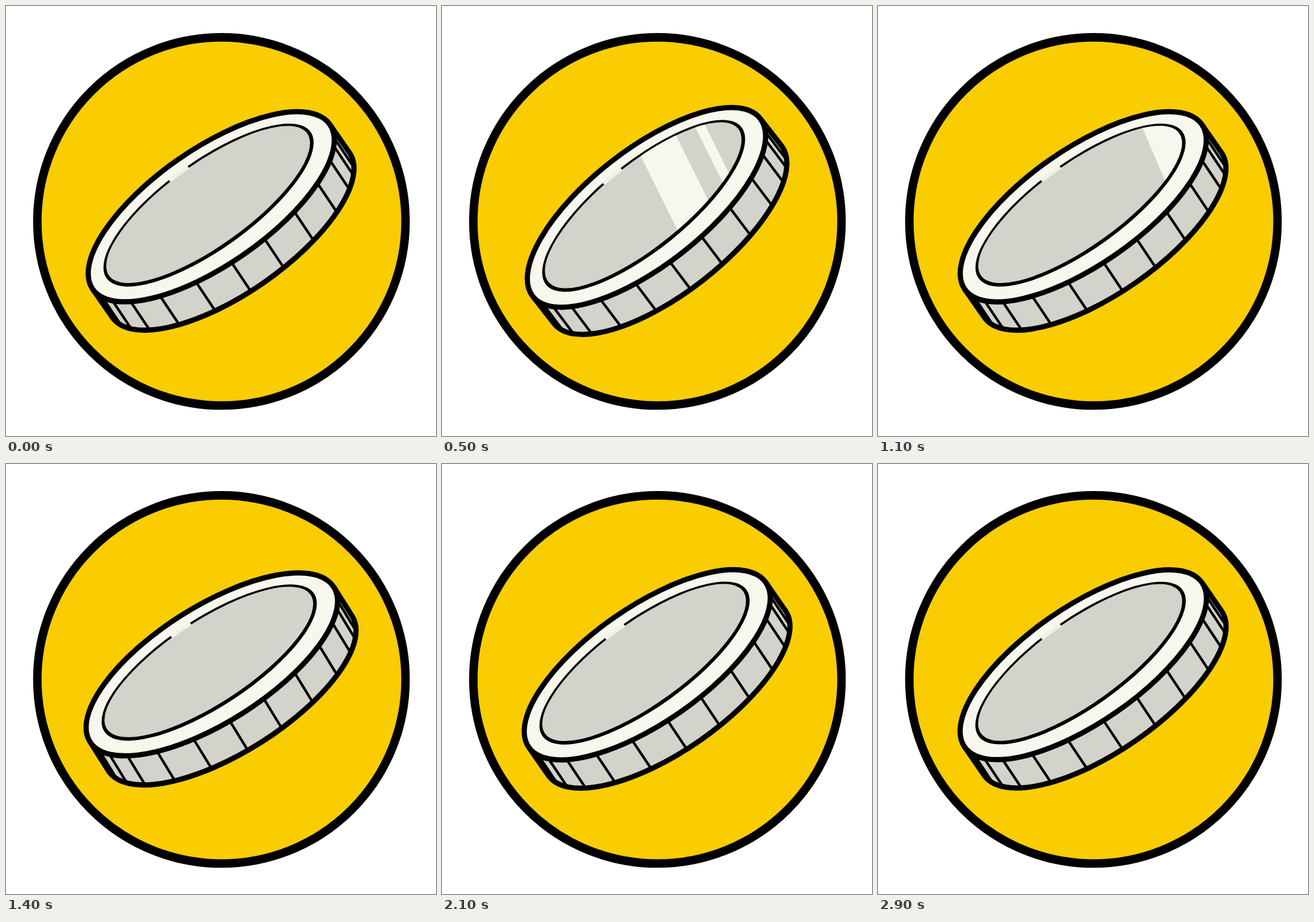
These frames come from a looping animation (700 px wide and 700 px high, 3 s). An HTML page:

```html
<!DOCTYPE html>
<html lang="en">
<head>
<meta charset="utf-8">
<title>Spinning coin</title>
<style>
  html, body { margin: 0; width: 100%; height: 100%; overflow: hidden; background: #fff; }
  svg { display: block; width: 100%; height: 100%; }
</style>
</head>
<body>
<svg viewBox="0 0 700 700">
  <clipPath id="face"><ellipse cx="-1.5" cy="-34.2" rx="198.5" ry="66.8"/></clipPath>
  <circle cx="350.7" cy="350.7" r="299.7" fill="#f9cd02" stroke="#000" stroke-width="13.8"/>
  <g id="coin">
    <path d="M-235-28V28A235 94 0 0 0 235 28V-28" fill="#d3d2cb" stroke="#000" stroke-width="8.5"/>
    <path id="ridges" fill="none" stroke="#000" stroke-width="4.2"/>
    <ellipse cy="-28.2" rx="235" ry="94" fill="#f8f7ee" stroke="#000" stroke-width="8.5"/>
    <g transform="rotate(-.9)">
      <ellipse cx="-1.5" cy="-33" rx="204.3" ry="71.5"/>
      <ellipse cx="-1.5" cy="-34.2" rx="198.5" ry="66.8" fill="#d3d2cb"/>
      <g clip-path="url(#face)">
        <path id="shine" d="M0-80H68V80H0ZM103-80H119V80H103Z" fill="#f8f7ee"/>
      </g>
      <path d="M-30-102.2Q-10-103.2 8-102.4" fill="none" stroke="#f1f0e7" stroke-width="6"/>
    </g>
  </g>
</svg>
<script>
const LOOP = 3000, STEP = 100, SPIN = 700, TILT = -34.8;
const swing = [[SPIN, 3.7], [1140, -.1], [1590, 3.9], [2050, -.1], [2570, 4.1], [2940, 0], [LOOP, 0]];
const coin = document.getElementById('coin');
const shine = document.getElementById('shine');

// Evenly spaced ridges that crowd together towards both ends.
let ridges = '';
for (let k = -5; k <= 6; k++) {
  const flat = 66 * (k - .35);
  const x = flat / (1 + Math.abs(flat / 237) ** 4.3) ** (1 / 4.3) - 1.5;
  ridges += `M${x} ${94 * Math.sqrt(1 - (x / 235) ** 2) - 28.2}l-1 56.4`;
}
document.getElementById('ridges').setAttribute('d', ridges);

function angleAt(t) {
  if (t < SPIN) return 363.7 * (1 - (1 - (t / SPIN) ** 2) ** 5.55);
  const i = swing.findIndex(([end]) => t < end);
  const [t0, a0] = swing[i - 1], [t1, a1] = swing[i];
  return a0 + (a1 - a0) * (1 - Math.cos(Math.PI * (t - t0) / (t1 - t0))) / 2;
}

// The glint crosses the face twice: during the spin and just after it.
function shineAt(t) {
  return t < SPIN ? -249 + 1.4 * (t - 300) : 144 + 1.4 * (t - 1100);
}

function draw(now) {
  const t = Math.floor(now % LOOP / STEP) * STEP;
  coin.setAttribute('transform', `translate(350.2 350) rotate(${TILT + angleAt(t)})`);
  shine.setAttribute('transform', `translate(${shineAt(t)} -33) skewX(-12.5)`);
}

const start = performance.now();
function tick() {
  draw(performance.now() - start);
  requestAnimationFrame(tick);
}
tick();
</script>
</body>
</html>
```
